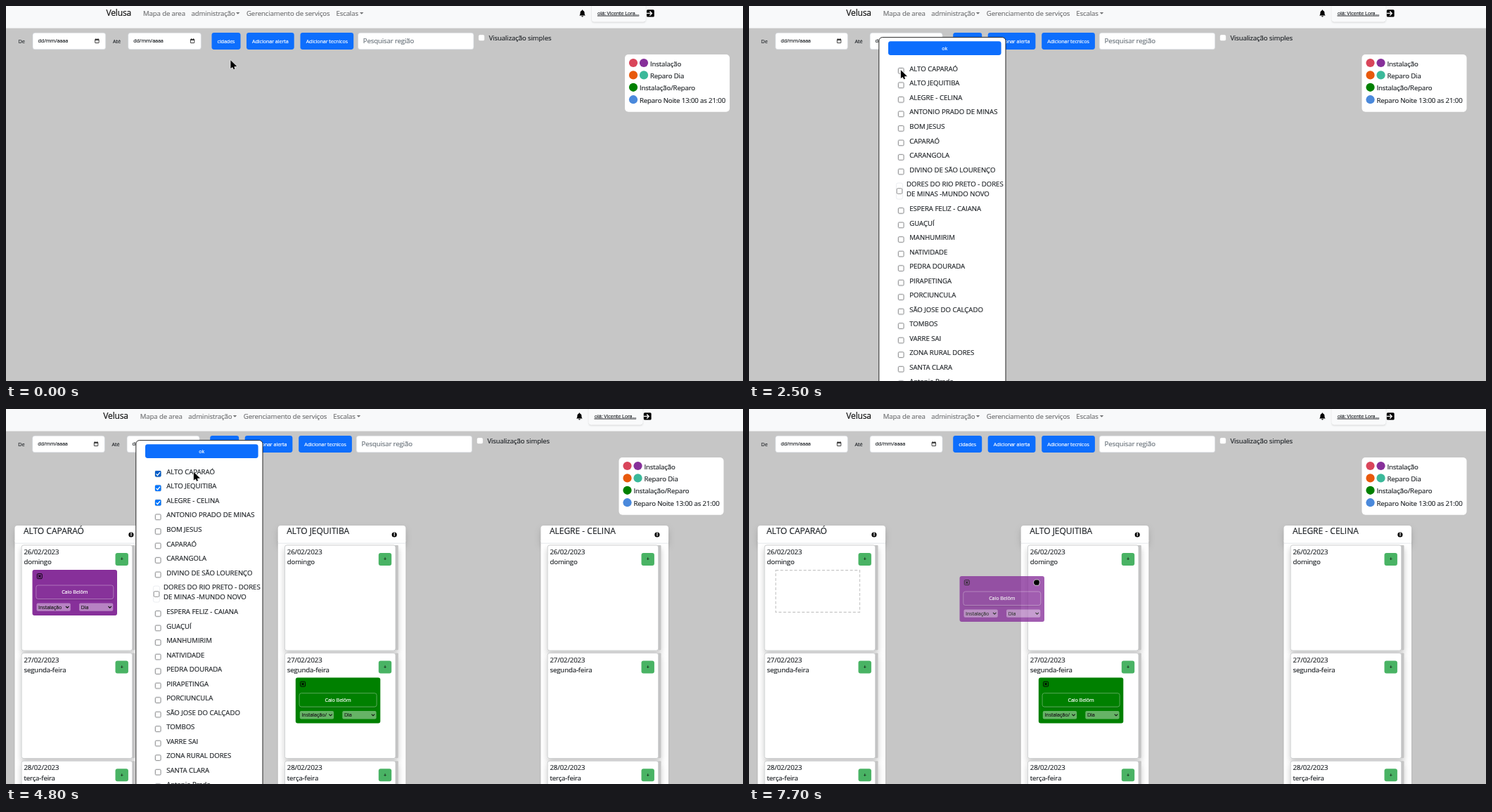
Write an HTML page that moves like this. It is 1048x534 px and loops after 8 s.

```html
<!DOCTYPE html>
<html lang="pt-BR">
<head>
<meta charset="utf-8">
<title>Escalas</title>
<style>
  html, body { margin: 0; width: 100%; height: 100%; overflow: hidden; background: #c6c6c6; }
  svg { display: block; width: 100%; height: 100%; }
  text { font-family: "Open Sans", "Noto Sans", sans-serif; letter-spacing: -.012em; white-space: pre; stroke-width: .18; }
  .caps { letter-spacing: 0; }
</style>
</head>
<body>
<svg id="stage" viewBox="0 0 1048 534">
  <defs>
    <filter id="soft" x="-20%" y="-30%" width="140%" height="220%">
      <feDropShadow dx="0" dy="4.8" stdDeviation="4.8" flood-opacity=".17"/>
    </filter>
    <filter id="deep" x="-20%" y="-20%" width="140%" height="140%">
      <feDropShadow dx="0" dy="4.8" stdDeviation="4.5" flood-opacity=".22"/>
    </filter>
    <filter id="thin" x="-20%" y="-30%" width="140%" height="180%">
      <feDropShadow dx="0" dy="1.2" stdDeviation="1.3" flood-opacity=".16"/>
    </filter>
  </defs>
</svg>
<script>
const LOOP = 8000, INK = '#212529', BLUE = '#0d6efd', BLUE_HOVER = '#0b5ed7';
const PURPLE = '#87309a', GREEN = '#008000';
const stage = document.getElementById('stage');

function add(parent, tag, attrs = {}) {
  const el = document.createElementNS('http://www.w3.org/2000/svg', tag);
  for (const key in attrs) el.setAttribute(key, attrs[key]);
  return parent.appendChild(el);
}
const group = (p, attrs) => add(p, 'g', attrs);
const rect = (p, x, y, width, height, fill, more) => add(p, 'rect', { x, y, width, height, fill, ...more });
const circle = (p, cx, cy, r, fill) => add(p, 'circle', { cx, cy, r, fill });
const line = (p, d, stroke, width, more) =>
  add(p, 'path', { d, stroke, 'stroke-width': width, fill: 'none', ...more });
function text(p, x, y, value, size = 9.6, fill = INK, more) {
  const el = add(p, 'text', { x, y, 'font-size': size, fill, stroke: fill, ...more });
  if (/^[A-Z]{2}/.test(value) || /^[A-ZÀ-Ý]{2}/.test(value)) el.classList.add('caps');
  el.textContent = value;
  return el;
}
const centred = { 'text-anchor': 'middle' };
const show = (el, on) => el.setAttribute('visibility', on ? 'visible' : 'hidden');
const place = (el, x, y) => el.setAttribute('transform', `translate(${x} ${y})`);

function button(p, x, y, w, h, label) {
  const face = rect(p, x, y, w, h, BLUE, { rx: 3.4 });
  text(p, x + w / 2, y + h / 2 + 2.5, label, 7.2, '#fff', centred);
  return face;
}

function navBar(p) {
  text(p, 142.5, 14.3, 'Velusa', 12, '#111');
  const grey = '#707173';
  text(p, 195, 13.7, 'Mapa de area', 9.6, grey);
  text(p, 263.5, 13.7, 'administração', 9.6, grey);
  text(p, 342, 13.7, 'Gerenciamento de serviços', 9.6, grey);
  text(p, 469.5, 13.7, 'Escalas', 9.6, grey);
  for (const x of [327, 503]) add(p, 'path', { d: `M${x} 9h5.4l-2.7 2.8z`, fill: grey });

  add(p, 'path', {
    d: 'M815.2 13.6c1.4-1.3 1.3-2.6 1.4-4.2.1-1.6 1-2.6 2.4-2.9v-.9h1.2v.9c1.4.3 2.3 1.3 2.4 2.9.1 1.6 0 2.9 1.4 4.2z' +
       'M818.2 14.2h2.8q-.2 1.4-1.4 1.4t-1.4-1.4z', fill: '#000'
  });
  rect(p, 833, -6, 76.5, 28.3, '#f9fafb', { rx: 3.5, filter: 'url(#thin)' });
  text(p, 841, 12.7, 'olá: Vicente Lora...', 7.2, INK, { 'text-decoration': 'underline' });
  rect(p, 911, 5.2, 10.8, 10.3, '#000', { rx: 1.6 });
  line(p, 'M911 10.4h7M915.4 7.4l3 3-3 3', '#fff', 1.4);
}

function toolBar(p, narrow) {
  const at = x => x - (narrow ? Math.min(2.3, x * .0095) : 0);
  const field = (x1, x2) => rect(p, at(x1), 38.2, at(x2) - at(x1), 23.6, '#fff',
    { rx: 3.4, stroke: '#ced4da', 'stroke-width': .6 });
  const dateField = (label, labelX, x1, x2) => {
    text(p, at(labelX), 52.5, label, 7.2);
    field(x1, x2);
    text(p, at(x1) + 7.5, 52.4, 'dd/mm/aaaa', 7.2);
    const x = at(x2) - 15;
    rect(p, x, 47.4, 5.4, 5.2, 'none', { stroke: '#111', 'stroke-width': .8, rx: .4 });
    line(p, `M${x} 48.3h5.4M${x + 1.2} 46.4v1.2M${x + 4.2} 46.4v1.2`, '#111', 1);
  };
  dateField('De', 17.5, 38, 141.7);
  dateField('Até', 152, 173.7, 277.4);
  const cities = button(p, at(292.5), 38, 41, 24, 'cidades');
  button(p, at(342), 38, 67.7, 24, 'Adicionar alerta');
  button(p, at(418.5), 38, 75.7, 24, 'Adicionar tecnicos');
  field(500.5, 665);
  text(p, at(507.8), 53.4, 'Pesquisar região', 9.6, '#6c757d');
  rect(p, at(671.7), 40.7, 9, 9, '#fff', { rx: 2.3, stroke: '#bbb', 'stroke-width': .6 });
  text(p, at(686.7), 48.7, 'Visualização simples');
  return cities;
}

function legend(p) {
  rect(p, 880, 69, 149, 81.8, '#fff', { rx: 5 });
  const rows = [
    ['Instalação', '#d9455a', PURPLE],
    ['Reparo Dia', '#e8590c', '#3bb99a'],
    ['Instalação/Reparo', GREEN],
    ['Reparo Noite 13:00 as 21:00', '#4a89dc']
  ];
  rows.forEach(([label, ...dots], i) => {
    const y = 81 + i * 17.4;
    dots.forEach((fill, j) => circle(p, 892 + j * 15, y, 6.1, fill));
    text(p, 886 + dots.length * 15, y + 4.6, label);
  });
}

// Technician card; its own corner is the origin
function taskCard(p, fill, kind) {
  const g = group(p);
  rect(g, 0, 0, 120.5, 65, fill, { rx: 3 });
  rect(g, 6.8, 5.6, 7, 7, 'none', { rx: 1.2, stroke: '#000', 'stroke-width': .9 });
  line(g, 'M8.6 7.4l3.4 3.4M12 7.4l-3.4 3.4', '#000', 1.1);
  rect(g, 5.3, 22, 110, 19.5, fill, { rx: 3, stroke: '#fff', 'stroke-opacity': .45, 'stroke-width': .7, filter: 'url(#thin)' });
  text(g, 60.3, 34.3, 'Caio Belôm', 7.2, '#fff', centred);
  [[6, kind], [66.5, 'Dia']].forEach(([x, label]) => {
    rect(g, x, 47.4, 48.3, 11.4, '#fff', { rx: 2, opacity: .4 });
    text(g, x + 2.6, 55.6, label, 7.2, '#1c1c1c');
    line(g, `M${x + 41.5} 52l2.2 2.2 2.2-2.2`, '#111', 1.1);
  });
  return g;
}

// City column; task is [day index, colour, kind]
function column(title, task) {
  const root = group(board);
  rect(root, 0, 166, 181.5, 25, '#fff', { rx: 4, filter: 'url(#soft)' });
  const body = group(root);
  rect(body, 0, 187, 181.5, 360, '#fff', { filter: 'url(#thin)' });
  const days = ['domingo', 'segunda-feira', 'terça-feira'];
  days.forEach((day, i) => {
    const y = 194 + i * 153.6;
    const sheet = group(body, { filter: 'url(#deep)' });
    rect(sheet, 166, y, 5, 149.5, '#c4c4c4', { rx: 1 });
    rect(sheet, 9.6, y, 157.6, 150, '#fff', { rx: 3, stroke: '#c2c4c6', 'stroke-width': .8 });
    text(body, 13, y + 12.9, `${26 + i}/02/2023`);
    text(body, 13, y + 27.3, day);
    rect(body, 143, y + 11, 18.4, 18, '#49b364', { rx: 3 });
    text(body, 152.2, y + 22.4, '+', 7.2, '#111', centred);
  });
  line(root, 'M0 191.2H181.5', '#dcdfe2', .7);
  text(root, 12.4, 177.8, title, 12);
  circle(root, 165.4, 179, 3.6, '#000');
  text(root, 165.4, 181.3, 'i', 6.2, '#fff', { ...centred, 'font-weight': 700 });
  let card;
  if (task) {
    card = taskCard(body, task[1], task[2]);
    place(card, 25, 229 + task[0] * 153.6);
  }
  return { root, body, card };
}

function checkBox(p, x, y, tall) {
  rect(p, x - 4.6, y - tall / 2, 9.2, tall, '#fff', { rx: 2.5, stroke: '#dde1e6', 'stroke-width': .6 });
  rect(p, x - 3.8, y - 3.8, 7.6, 7.6, '#fff', { rx: 1.4, stroke: '#767676', 'stroke-width': .8 });
  const mark = group(p);
  const face = rect(mark, x - 4.2, y - 4.2, 8.4, 8.4, '#0075ff', { rx: 1.4 });
  line(mark, `M${x - 2.6} ${y + .1}l1.9 2 3.4-4.2`, '#fff', 1.3);
  show(mark, false);
  return { mark, face };
}

function cityList(p) {
  rect(p, 184.8, 44.6, 180.2, 500, '#fff', { rx: 5, stroke: '#111', 'stroke-width': .9 });
  const ok = button(p, 198, 50.3, 160.6, 19.6, 'ok');
  const names = ['ALTO CAPARAÓ', 'ALTO JEQUITIBA', 'ALEGRE - CELINA', 'ANTONIO PRADO DE MINAS',
    'BOM JESUS', 'CAPARAÓ', 'CARANGOLA', 'DIVINO DE SÃO LOURENÇO',
    'DORES DO RIO PRETO - DORES|DE MINAS -MUNDO NOVO', 'ESPERA FELIZ - CAIANA', 'GUAÇUÍ',
    'MANHUMIRIM', 'NATIVIDADE', 'PEDRA DOURADA', 'PIRAPETINGA', 'PORCIUNCULA',
    'SÃO JOSE DO CALÇADO', 'TOMBOS', 'VARRE SAI', 'ZONA RURAL DORES', 'SANTA CLARA', 'Antonio Prado'];
  let y = 89.4;
  const boxes = names.map(name => {
    const lines = name.split('|'), wide = lines.length > 1;
    lines.forEach((part, i) => text(p, wide ? 224 : 228.2, y + 3.5 + i * 14.4, part));
    const box = wide ? checkBox(p, 214, y + 10, 23) : checkBox(p, 216.2, y + 2.9, 10);
    y += wide ? 35 : 20.52;
    return box;
  });
  return { ok, boxes };
}

// ---- scene ----
rect(stage, 0, 0, 1048, 534, '#c6c6c6');
rect(stage, 0, 0, 1048, 31.6, '#f8f9fa');
const nav = group(stage);
navBar(nav);
const wideBar = group(stage), narrowBar = group(stage);
const cities = toolBar(wideBar, false);
toolBar(narrowBar, true);
const key = group(stage);
legend(key);

const board = group(stage);
const first = column('ALTO CAPARAÓ', [0, PURPLE, 'Instalação']);
const second = column('ALTO JEQUITIBA', [1, GREEN, 'Instalação/']);
const third = column('ALEGRE - CELINA');
place(first.root, 12.5, 0);
place(third.root, 760.5, 0);
const gap = rect(stage, 38, 229.7, 119.5, 59.6, 'none',
  { stroke: '#c6c6c6', 'stroke-width': 1.2, 'stroke-dasharray': '4 2.6' });
const dragged = taskCard(stage, PURPLE, 'Instalação');
dragged.setAttribute('opacity', .78);

const popup = group(stage);
const { ok, boxes } = cityList(popup);

const pointer = group(stage);
const shape = d => add(pointer, 'path',
  { d, fill: '#000', stroke: '#fff', 'stroke-width': .7, 'stroke-linejoin': 'round' });
const arrow = shape('M0 0V13L3 11 4.6 14.2 7 13 5.7 10.2 10 9.8Z');
const hand = shape('M-1 1.2Q-1 0 0 0T1 1.2V5L6 6.2Q7.6 6.8 7.2 8.6L6.2 13.6H.6L-2.6 9Q-3 7.4-1 8Z');
const fist = shape('M-3.6-2.4Q-2-4.6 0-4 2.4-4.6 3.8-2.6 4.8-.4 3.9 2L3 4.2H-2.4L-4.4 1.2Q-4.8-1-3.6-2.4Z');

// ---- motion ----
// time, x, y, length of the glide that leads there (none: a jump)
const path = [
  [0, 319, 76.5], [700, 312, 54, 600], [900, 305, 52.5], [1300, 306, 91, 300],
  [2300, 217, 92, 900], [2500, 215.5, 90.5, 200], [3000, 218, 113, 200], [3200, 217, 113],
  [3400, 213, 118], [3600, 213, 139], [3900, 213, 131], [4400, 241, 128], [4800, 266.5, 89],
  [5000, 272, 75.5], [5200, 275, 62], [5400, 288, 58], [5600, 289, 83], [5900, 289, 121],
  [6200, 249.5, 169, 200], [6400, 217.5, 203], [6700, 162, 229, 200], [6900, 134.5, 233],
  [7200, 137, 238, 200], [7500, 271, 257], [7700, 409, 247]
];
function pointerAt(t) {
  let i = path.length - 1;
  while (path[i][0] > t) i--;
  const [, x, y] = path[i], next = path[i + 1];
  if (!next || !next[3]) return [x, y];
  const k = Math.max(0, 1 - (next[0] - t) / next[3]);
  return [x + (next[1] - x) * k, y + (next[2] - y) * k];
}

function draw(time) {
  const t = Math.floor(time / 100) * 100;
  const within = (a, b) => t >= a && t < b;
  const opened = t >= 1100, dragging = t >= 7500;

  place(nav, opened ? -4.2 : 0, 0);
  place(key, opened ? -8.5 : 0, 0);
  show(wideBar, !opened);
  show(narrowBar, opened);
  cities.setAttribute('fill', within(400, 1100) ? BLUE_HOVER : BLUE);

  popup.setAttribute('display', within(1100, 5600) ? 'inline' : 'none');
  ok.setAttribute('fill', within(1100, 1200) || within(5200, 5600) ? BLUE_HOVER : BLUE);
  [2900, 3400, 4200].forEach((start, i) => {
    const hover = within(start, start + 200) || (i === 0 && within(4800, 5000));
    show(boxes[i].mark, t >= start);
    boxes[i].face.setAttribute('fill', hover ? '#005cc8' : '#0075ff');
  });

  show(first.root, t >= 2900);
  show(first.body, t >= 3000);
  show(second.root, t >= 3600);
  show(second.body, t >= 3900);
  show(third.root, t >= 4800);
  show(third.body, t >= 4800);
  place(second.root, t < 4800 ? 760.5 : 386.8, 0);

  show(first.card, t >= 3000 && !dragging);
  show(gap, dragging);
  show(dragged, dragging);
  if (t < 7700) place(dragged, 138, 248);
  else place(dragged, 299.5, 238);

  const [x, y] = pointerAt(t);
  const pointing = y < 72;
  place(pointer, x, y);
  show(arrow, !pointing && !dragging);
  show(hand, pointing);
  show(fist, dragging);
}

function frame() {
  draw(performance.now() % LOOP);
  requestAnimationFrame(frame);
}
frame();
</script>
</body>
</html>
```
